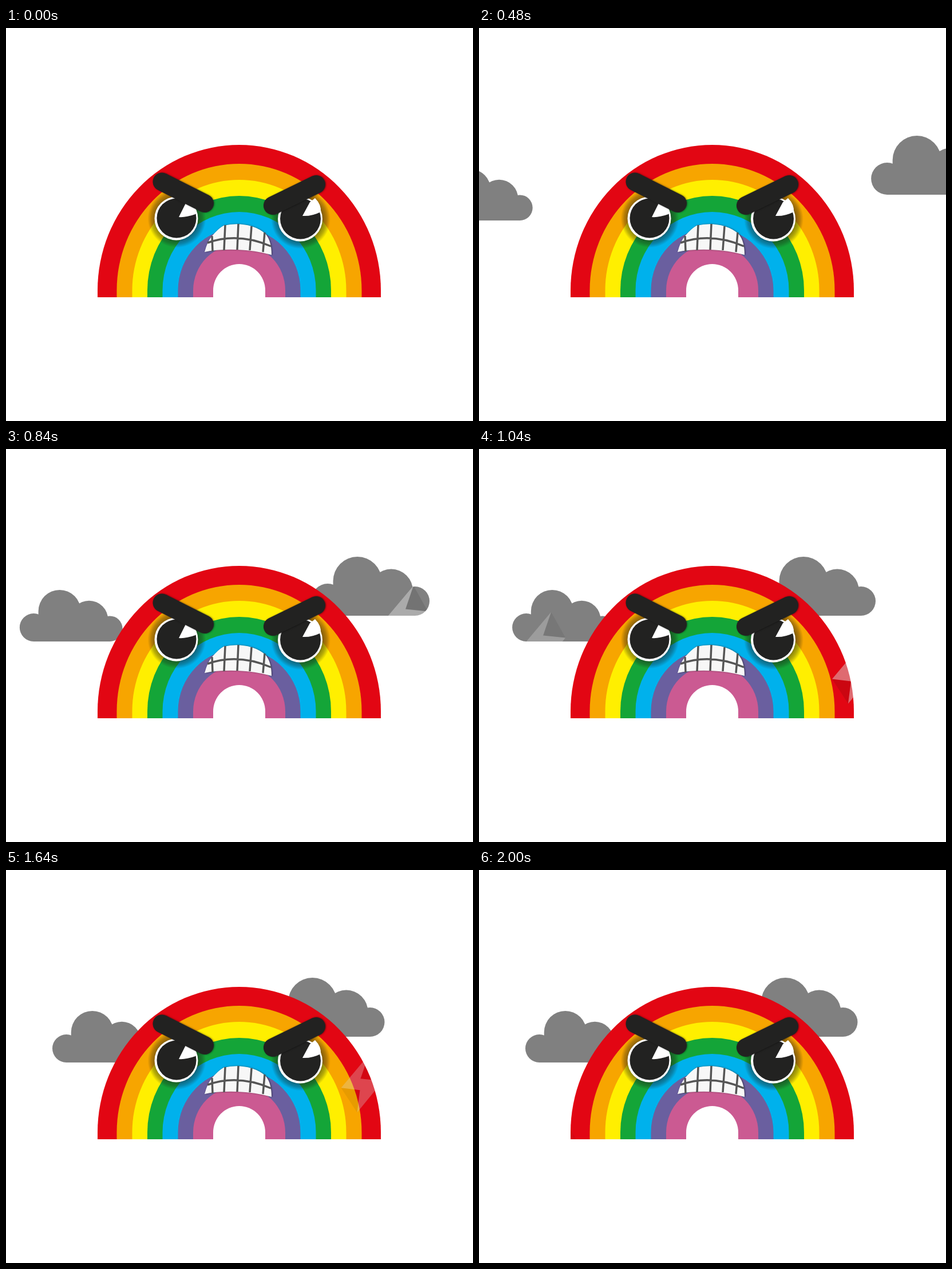
An HTML page with a canvas that plays this animation: 816 by 686 pixels, repeating every 2040 ms.

```html
<!DOCTYPE html>
<html>
<head>
<meta charset="utf-8">
<title>Angry rainbow</title>
<style>
  html, body { margin: 0; width: 100%; height: 100%; overflow: hidden; background: #fff; }
  canvas { display: block; }
</style>
</head>
<body>
<canvas width="816" height="686"></canvas>
<script>
const ctx = document.querySelector('canvas').getContext('2d');
const LOOP = 2040, STEP = 40, TRAVEL = 1440;
const DARK = '#222221';

function circle(x, y, r, fill) {
  ctx.fillStyle = fill;
  ctx.beginPath();
  ctx.arc(x, y, r, 0, 7);
  ctx.fill();
}

function shape(d, fill) {
  ctx.fillStyle = fill;
  ctx.fill(new Path2D(d));
}

function line(d, color, width) {
  ctx.strokeStyle = color;
  ctx.lineWidth = width;
  ctx.stroke(new Path2D(d));
}

// Half ellipse on short straight legs
function arch(rx, ry, fill) {
  ctx.fillStyle = fill;
  ctx.beginPath();
  ctx.ellipse(407.5, 458, rx, ry, 0, Math.PI, 0);
  ctx.lineTo(407.5 + rx, 470);
  ctx.lineTo(407.5 - rx, 470);
  ctx.fill();
}

function rainbow() {
  arch(247.5, 254, '#e20613');
  arch(214, 221, '#f7a500');
  arch(187, 193, '#ffef00');
  arch(160.5, 165, '#14a538');
  arch(134, 137, '#00b1ec');
  arch(107, 109, '#6a5f9f');
  arch(80.5, 81, '#cb5a92');
  ctx.globalCompositeOperation = 'destination-out';
  arch(45.5, 46, '#000');
  ctx.globalCompositeOperation = 'source-over';
}

function eye(x, y, r, glint) {
  const halo = ctx.createRadialGradient(x + 1, y, r - 3, x + 1, y, r + 13);
  halo.addColorStop(0, 'rgba(30,30,20,.6)');
  halo.addColorStop(.6, 'rgba(30,30,20,.3)');
  halo.addColorStop(1, 'rgba(30,30,20,0)');
  circle(x + 1, y, r + 13, halo);
  circle(x, y, r, '#fff');
  circle(x + .5, y - .5, r - 3.5, DARK);
  shape(glint, '#fff');
}

function face() {
  ctx.lineCap = 'round';
  eye(297.5, 332.5, 38, 'M302 330L314 306L330 314Q335 322 331 325Q314 331 302 330Z');
  eye(514, 333.5, 39, 'M518 328L531 304L540 297Q551 308 550 321Q534 329 518 328Z');

  ctx.shadowColor = 'rgba(0,0,0,.5)';
  ctx.shadowBlur = 3;
  line('M272.5 268.5L347 306', DARK, 32);
  line('M542 273L466 310', DARK, 32);

  ctx.shadowOffsetX = 1;
  shape('M347 391Q352 372 360 363Q371 350 380 345Q405 339 429 346Q445 351 454 360Q464 372 464 396Q435 388 404 387Q370 386 347 391Z', '#f7f7f7');
  ctx.shadowColor = 'transparent';
  ctx.lineCap = 'butt';
  line('M352 375Q405 356 463 381M360 363L361 390M383 344L381 388M406 342L404 387M429 346L426 388M452 357L449 391', '#555', 3.5);
}

function cloud(x, y, scale) {
  ctx.save();
  ctx.translate(x, y);
  ctx.scale(scale, scale);
  const p = new Path2D();
  for (const [cx, cy, r] of [[80, 42.5, 42.5], [139, 59.5, 38], [28, 75, 28], [180.5, 77.5, 25.5]]) {
    p.moveTo(cx + r, cy);
    p.arc(cx, cy, r, 0, 2 * Math.PI);
  }
  p.rect(28, 75, 152.5, 28);
  p.rect(37.5, 42.5, 85, 40);
  p.rect(105, 59.5, 72, 30);
  ctx.fillStyle = '#808080';
  ctx.fill(p);
  ctx.restore();
}

// A bolt drops from its cloud and fades; it only shows on painted areas
function bolt(t, start, x, y, alpha) {
  const age = t - start;
  if (age <= 0 || age >= 440) return;
  ctx.save();
  ctx.translate(x, y + age * .53);
  ctx.globalAlpha = alpha * Math.min(1, age / 80, (440 - age) / 120);
  shape('M-34 16L14 -41L39 4L-6 59Z', 'rgba(0,0,0,.25)');
  shape('M-34 16L14 -41L0 0L39 4L-6 59L-1 20Z', '#fff');
  ctx.restore();
}

// Share of the way still to go: quick start, long soft landing
function remaining(t) {
  const left = 1 - Math.min(1, t / TRAVEL);
  let lo = 0, hi = 1;
  for (let i = 0; i < 24; i++) {
    const u = (lo + hi) / 2;
    if (.8 * u ** 3 - 1.6 * u * u + 1.8 * u < left) lo = u; else hi = u;
  }
  return 3 * lo * lo - 2 * lo ** 3;
}

function draw(t) {
  ctx.clearRect(0, 0, 816, 686);
  rainbow();
  face();

  const r = remaining(t);
  const leftX = 81 - 266 * r, rightX = 455.5 + 365.5 * r;
  ctx.globalCompositeOperation = 'destination-over';
  cloud(leftX, 246, .873);
  cloud(rightX, 188, 1);

  ctx.globalCompositeOperation = 'source-atop';
  bolt(t, 760, rightX + 164, 237, .4);
  bolt(t, 1400, rightX + 164, 237, .25);
  bolt(t, 960, leftX + 54, 283, .27);
  bolt(t, 1640, leftX + 54, 283, .27);
  ctx.globalCompositeOperation = 'source-over';
}

const begin = performance.now();
function tick() {
  const t = (performance.now() - begin) % LOOP;
  draw(Math.floor(t / STEP) * STEP);
  requestAnimationFrame(tick);
}
tick();
</script>
</body>
</html>
```
